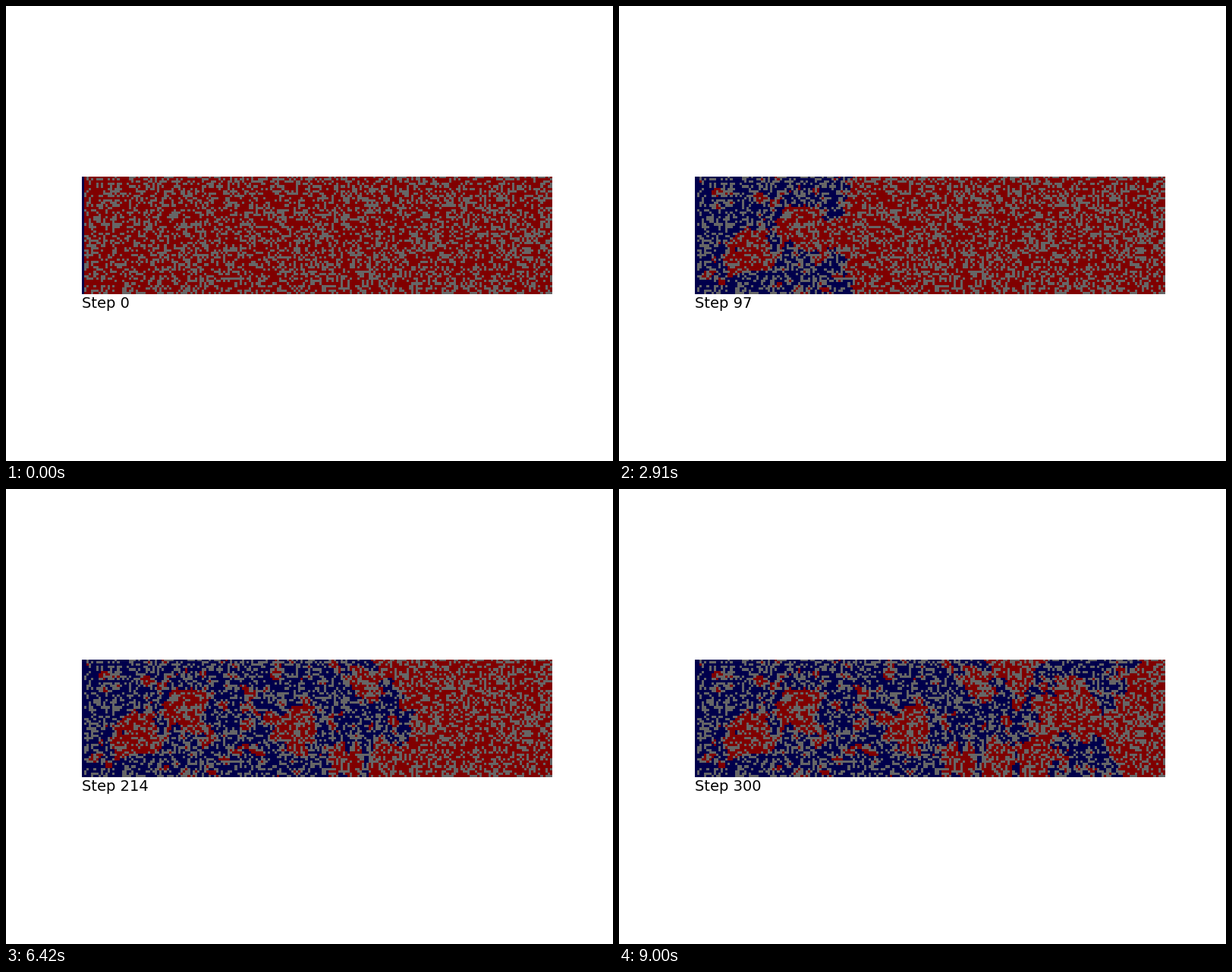
These frames come from a looping animation (800x600 px, 9.03 s). A matplotlib script:

```python
import numpy as np
import matplotlib.pyplot as plt
from matplotlib.animation import FuncAnimation

ROWS, COLS, LAST = 50, 200, 300
BLUE, GREY, RED = (0, 0, 76), (102, 102, 102), (128, 0, 0)

# Large regions that stay dry: column, row, radius in cells
DRY = [(21, 31, 10), (44, 20, 9), (90, 28, 10), (112, 43, 8), (129, 43, 8),
       (144, 43, 9), (121, 11, 6), (136, 5, 10), (157, 22, 13), (192, 30, 17)]

rng = np.random.default_rng(4)


def neighbours(a, fill):
    """Four shifted copies; rows wrap around, columns do not."""
    left, right = np.full_like(a, fill), np.full_like(a, fill)
    left[:, 1:], right[:, :-1] = a[:, :-1], a[:, 1:]
    return np.stack([np.roll(a, 1, 0), np.roll(a, -1, 0), left, right])


def smooth_noise(passes):
    a = rng.normal(size=(ROWS, COLS))
    for _ in range(passes):
        a = (a + neighbours(a, 0).sum(0)) / 5
    return a / a.std()


def dry_mask():
    row, col = np.mgrid[:ROWS, :COLS]
    bump = np.full((ROWS, COLS), -0.33)
    for x, y, r in DRY:
        bump = np.maximum(bump, 1 - np.hypot(col - x, row - y) / r)
    return (bump + 0.25 * smooth_noise(5) > 0) & (col > 0)


def travel(cost):
    """Cheapest path length from the left edge to every cell."""
    dist = np.full(cost.shape, np.inf)
    dist[:, 0] = 0
    while True:
        new = np.minimum(dist, neighbours(dist, np.inf).min(0) + cost)
        if np.array_equal(new, dist):
            return dist
        dist = new


dry = dry_mask()
is_open = rng.random((ROWS, COLS)) < np.where(dry, 0.6, 0.63)
is_open[:, 0] = True
wet = is_open & ~dry
wet &= neighbours(wet, False).any(0)
dist = travel(np.where(dry, 8.0, np.where(is_open, 1.0, 2.5)))

# Pace the flood so its front slows down slightly on the way
reach = np.where(wet, dist, np.inf)
steps = np.arange(0, LAST + 1, 30)
front = (189 * (steps / LAST) ** 0.9).astype(int)
knots = [reach[:, c:].min() for c in front]
arrival = np.interp(dist, knots, steps, right=np.inf)
arrival[~wet] = np.inf

base = np.where(is_open[..., None], RED, GREY).astype(np.uint8)


def picture(step):
    img = base.copy()
    img[arrival <= step] = BLUE
    return img


fig, ax = plt.subplots(figsize=(8, 6), dpi=100)
ax.axis("off")
im = ax.imshow(picture(0), interpolation="nearest")
label = fig.text(0.125, 202 / 600, "Step 0", fontsize=14,
                 family="DejaVu Sans", va="baseline")


def update(step):
    im.set_data(picture(step))
    label.set_text(f"Step {step}")
    return im, label


anim = FuncAnimation(fig, update, frames=LAST + 1, interval=30,
                     repeat=True, repeat_delay=0)
plt.show()
```
